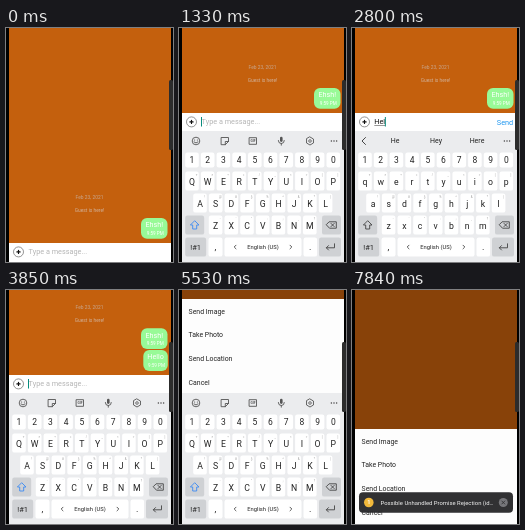
Write an HTML page that moves like this. It is 167x234 px and loops after 8000 ms.

```html
<!DOCTYPE html>
<html lang="en">
<head>
<meta charset="utf-8">
<style>
  html, body { margin: 0; width: 100%; height: 100%; overflow: hidden; background: #000; }
  svg { display: block; width: 100vw; height: 100vh; font-family: Roboto, "Open Sans", sans-serif; }
  text { white-space: pre; }
</style>
</head>
<body>
<svg id="stage" viewBox="0 0 167 234"></svg>
<script>
const LOOP = 8000, STEP = 70;
const KEYBOARD_HEIGHT = 131, SHEET_TOP = 139, BAR_TOP = 215, INK = '#222';

const rect = (x, y, w, h, fill, r = 0, extra = '') =>
  `<rect x="${x}" y="${y}" width="${w}" height="${h}" rx="${r}" fill="${fill}" ${extra}/>`;
const text = (x, y, size, fill, label, extra = '') =>
  `<text x="${x}" y="${y + size * 0.355}" font-size="${size}" fill="${fill}" ${extra}>${label}</text>`;
const middle = (x, y, size, fill, label, extra = '') =>
  text(x, y, size, fill, label, `text-anchor="middle" ${extra}`);
const line = (d, color = '#555', width = 0.9) =>
  `<path d="${d}" fill="none" stroke="${color}" stroke-width="${width}" stroke-linecap="round" stroke-linejoin="round"/>`;
const ring = (x, y, r, color, width = 0.9) =>
  `<circle cx="${x}" cy="${y}" r="${r}" fill="none" stroke="${color}" stroke-width="${width}"/>`;
const dot = (x, y, r, fill) => `<circle cx="${x}" cy="${y}" r="${r}" fill="${fill}"/>`;
const group = (id, body) => `<g id="${id}">${body}</g>`;
const escapeText = s => s.replace(/&/g, '&amp;').replace(/</g, '&lt;');

function bubble(x, y, width, label) {
  const center = x + width / 2;
  return rect(x, y, width, 20.8, '#98fa97', 6) +
    middle(center, y + 6.8, 7.2, '#fff', label) +
    middle(center + 1, y + 15.4, 4.6, '#fff', '9:59 PM');
}

function messages() {
  return middle(83.5, 169, 4.9, '#c8a58c', 'Feb 23, 2021') +
    middle(83.5, 182.2, 4.9, '#d2b39d', 'Guest is here!') +
    bubble(135, 190, 26.5, 'Ehsh!') +
    group('reply', bubble(137.3, 211.8, 24.5, 'Hello'));
}

function inputBar() {
  return rect(3, 0, 162, 234, '#fff') +
    ring(12.5, 8.9, 5, '#666', 0.7) +
    line('M10.9 8.9h3.2M12.5 7.3v3.2', '#111', 1.2) +
    group('placeholder', text(22.6, 8.7, 7.3, '#b5b5b5', 'Type a message...')) +
    text(22.3, 8.4, 7.3, '#111', '', 'id="draft"') +
    rect(22.3, 12, 1, 0.5, '#333', 0, 'id="underline"') +
    rect(22, 4, 1, 9.5, '#078c7d', 0, 'id="cursor"') +
    group('send', text(144.8, 9, 7.3, '#1e96f0', 'Send'));
}

function toolbar() {
  const gear = Array.from({ length: 6 }, (_, i) => {
    const a = i * Math.PI / 3;
    return `${i ? 'L' : 'M'}${131 + 4 * Math.sin(a)} ${113 - 4 * Math.cos(a)}`;
  }).join('') + 'Z';
  return ring(17, 113, 3.8, '#555') + dot(15.6, 112, 0.6, '#555') + dot(18.4, 112, 0.6, '#555') +
    line('M15 114q2 2.2 4 0') +
    line('M42.5 109.5h7v4l-3.2 3.2h-3.8zM49.5 113.5h-3.2v3.2') +
    line('M70.5 109.7h7v6.6h-7z') + middle(74, 113, 3.3, '#555', 'GIF', 'font-weight="700"') +
    rect(101, 108.7, 2.6, 5.2, '#555', 1.3) + line('M99.3 112.5q0 3 3 3t3-3M102.3 115.5v1.7') +
    line(gear) + ring(131, 113, 1.3, '#555', 0.8);
}

function suggestions() {
  return line('M13.5 109.5l-3.5 3.5l3.5 3.5', '#333') +
    [43, 84, 125].map((x, i) => middle(x, 113, 7, INK, '', `id="word${i}"`)).join('');
}

const LETTER_ROWS = [
  { keys: 'QWERTYUIOP', marks: '+×÷=/_<>[]', x: 13, y: 153 },
  { keys: 'ASDFGHJKL', marks: '!@#$%^&*(', x: 21, y: 175 },
  { keys: 'ZXCVBNM', marks: "-'\":;,?", x: 36.6, y: 197 }
];
const PITCH = 15.7;

function keyboard() {
  let out = rect(3, 103, 162, KEYBOARD_HEIGHT, '#ebecee') +
    group('toolbar', toolbar()) + group('suggestions', suggestions()) +
    [152.4, 155, 157.6].map(x => dot(x, 113, 0.75, '#444')).join('');
  [...'1234567890'].forEach((digit, i) => {
    const x = 13 + i * PITCH;
    out += rect(x - 6.8, 124.5, 13.6, 15, '#fff', 2.2) + middle(x, 132, 8.5, INK, digit);
  });
  for (const row of LETTER_ROWS) {
    [...row.keys].forEach((letter, i) => {
      const x = row.x + i * PITCH;
      out += rect(x - 6.8, row.y - 9.4, 13.6, 19, '#fff', 2.2) +
        middle(x, row.y + 1, 8.7, INK, letter, `class="letter" data-key="${letter}"`) +
        middle(x + 4.6, row.y - 5.8, 3, '#999', escapeText(row.marks[i]));
    });
  }
  const special = '#cfd1d4';
  out += rect(6.2, 187.6, 19, 19, special, 2.2) +
    `<path id="shift" d="M15.7 192.7l4.3 4.3h-2.3v4h-4v-4h-2.3z" fill="none" stroke-width=".9" stroke-linejoin="round"/>` +
    rect(143, 187.6, 19, 19, special, 2.2) +
    line('M150.5 193.8h6.8v6.4h-6.8l-3-3.2zM152 195.4l3.2 3.2M155.2 195.4l-3.2 3.2', '#333', 0.8);
  out += rect(6.2, 209.6, 21, 19, special, 2.2) + middle(16.7, 219, 7.5, INK, '!#1') +
    rect(29.5, 209.6, 14, 19, '#fff', 2.2) + middle(36.5, 219, 9, INK, ',') +
    rect(45.5, 209.6, 77, 19, '#fff', 2.2) + middle(84, 219, 5.8, INK, 'English (US)') +
    line('M57 217.2l-1.8 1.8l1.8 1.8M111 217.2l1.8 1.8l-1.8 1.8', '#333', 0.8) +
    rect(124.5, 209.6, 13.6, 19, '#fff', 2.2) + middle(131.3, 219, 9, INK, '.') +
    rect(140, 209.6, 22, 19, special, 2.2) +
    line('M155.5 215.8v4h-8M149.5 217.6l-2.2 2.2l2.2 2.2', '#444', 0.9);
  return out;
}

function sheet() {
  const items = ['Send Image', 'Take Photo', 'Send Location', 'Cancel'];
  return rect(3, 0, 162, 234, '#fdfdfd') +
    items.map((label, i) => text(9.6, 12.2 + i * 23.75, 6.9, '#222', label)).join('');
}

function toast() {
  return rect(7, 202.3, 154, 20.5, '#2b2b2d', 4, 'opacity=".97"') +
    dot(16.8, 212.5, 4.8, '#f2b93b') + middle(16.8, 212.5, 5.6, '#fff', '1', 'font-weight="600"') +
    text(28.5, 212.5, 5.9, '#f4f4f4', 'Possible Unhandled Promise Rejection (id…') +
    dot(151.3, 212.5, 4.5, '#77777b') +
    line('M149.8 211l3 3M152.8 211l-3 3', '#2b2b2d', 0.8);
}

const stage = document.getElementById('stage');
stage.innerHTML = rect(0, 0, 167, 234, '#000') + rect(3, 0, 162, 234, '#c4600d') +
  group('messages', messages()) + group('bar', inputBar()) +
  rect(3, 0, 162, 234, '#000', 0, 'id="dim"') +
  group('sheet', sheet()) + group('keyboard', keyboard()) + group('toast', toast()) +
  rect(0, 0, 3, 234, '#000') + rect(165, 0, 2, 234, '#000') +
  rect(163, 52, 4, 70, '#2c2c2c', 1.5);

const $ = id => document.getElementById(id);
const show = (id, on) => $(id).setAttribute('display', on ? 'inline' : 'none');
const moveY = (id, y) => $(id).setAttribute('transform', `translate(0 ${y})`);
const progress = (t, start, end) => Math.min(1, Math.max(0, (t - start) / (end - start)));
const letters = [...document.querySelectorAll('.letter')];

const OPEN = 1190, SEND = 3780, SHEET = 5250, CLOSE = 6160, TOAST = 6370;
const TYPED = [
  { at: 1820, draft: 'H', words: ['H', 'Hey', 'Hi'] },
  { at: 2450, draft: 'He', words: ['He', 'Hey', 'Here'] },
  { at: 2800, draft: 'Hel', words: ['Hel', 'Hello', 'Help'] },
  { at: 3080, draft: 'Hell', words: ['Hell', 'Hello', 'Hells'] },
  { at: 3430, draft: 'Hello', words: ['Hello', 'Hellos', 'Hello!'] }
];
const typedAt = t => TYPED.filter(k => t >= k.at).pop();

function render(time) {
  const t = Math.floor(time / STEP) * STEP;
  const open = t >= OPEN && t < CLOSE;
  const sent = t >= SEND;
  const typed = sent ? null : typedAt(t);
  const draft = typed ? typed.draft : '';

  moveY('messages', (open ? -130 : 0) - (sent ? 21.7 : 0));
  show('reply', sent);
  moveY('bar', open ? BAR_TOP - 130 : BAR_TOP);
  show('placeholder', !draft);
  show('send', draft);
  $('draft').textContent = draft;
  const width = draft ? $('draft').getComputedTextLength() : 0;
  $('underline').setAttribute('width', width);
  $('cursor').setAttribute('x', 22 + width);
  show('cursor', t >= 1050 && t < 1540 || t >= 1820 && t < 4410);

  // Ease-out rise behind the keyboard, then a hard drop when the layout grows.
  const rise = 1 - (1 - progress(t, SHEET - STEP, SHEET + 280)) ** 2;
  show('sheet', rise > 0);
  show('dim', rise > 0);
  $('dim').setAttribute('opacity', 0.31 * rise);
  moveY('sheet', t >= CLOSE ? SHEET_TOP : 104 - 95 * rise);

  const entering = 1 - progress(t, OPEN - STEP, OPEN + 2 * STEP);
  const leaving = progress(t, CLOSE - STEP, TOAST);
  show('keyboard', t >= OPEN && t < TOAST);
  moveY('keyboard', t < CLOSE ? 42 * entering ** 2 : 144 * leaving ** 2);
  $('keyboard').setAttribute('opacity', t < CLOSE ? 1 - 0.7 * entering : 1 - leaving);

  // Suggestions trail the typed letter by one step.
  const suggested = !sent && typedAt(t - STEP);
  show('toolbar', !suggested);
  show('suggestions', suggested);
  if (suggested) suggested.words.forEach((word, i) => { $('word' + i).textContent = word; });
  for (const el of letters) {
    const letter = el.dataset.key;
    el.textContent = draft ? letter.toLowerCase() : letter;
  }
  $('shift').setAttribute('stroke', draft ? '#444' : '#3d8bf2');

  show('toast', t >= TOAST);
}

const start = performance.now();
function tick() {
  render((performance.now() - start) % LOOP);
  requestAnimationFrame(tick);
}
tick();
</script>
</body>
</html>
```
